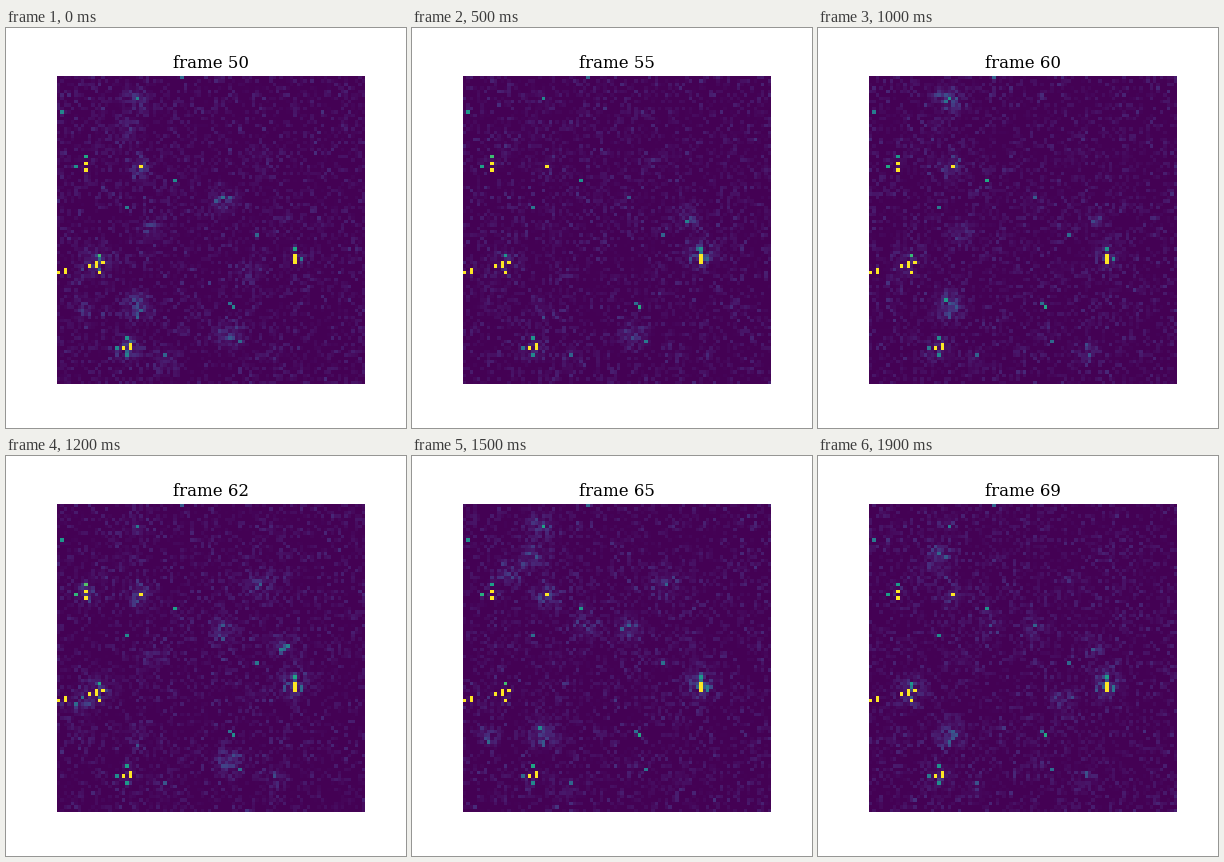
Recreate the animation shown at these times as a matplotlib script. Size 400 by 400 pixels, loop 2000 ms.

```python
import numpy as np
import matplotlib.pyplot as plt
from matplotlib.animation import FuncAnimation

plt.rcParams["font.family"] = "DejaVu Serif"

N = 90        # cells per side
FRAMES = 20
FIRST = 50    # number in the first title

# saturated spots: column, row, height in cells
BRIGHT = [(8, 25, 1), (8, 27, 1), (24, 26, 1), (9, 55, 1), (11, 54, 2),
          (13, 54, 1), (0, 57, 1), (2, 56, 2), (12, 57, 1), (69, 52, 3),
          (19, 79, 1), (21, 78, 2)]

# lasting weaker cells, brightest first: column, row
GLOW = [(8, 23), (12, 52), (5, 26), (69, 50), (51, 67), (20, 76), (34, 30),
        (23, 6), (1, 10), (20, 81), (20, 38), (17, 79), (71, 53), (58, 46),
        (50, 66), (53, 77), (48, 35), (36, 0), (31, 81), (23, 70)]

# centres of the areas that flare up now and then, busiest first
SITES = [(8, 25), (69, 52), (20, 79), (7, 57), (12, 54), (23, 67), (35, 35),
         (23, 6), (59, 23), (65, 41), (27, 45), (56, 57), (31, 83), (50, 75),
         (13, 20), (24, 26), (48, 36), (20, 15), (7, 67), (63, 80)]

rows, cols = np.mgrid[:N, :N]
fixed = np.random.default_rng(7)
texture = fixed.gamma(1.5, 0.6, (N, N))
glow_levels = np.linspace(0.64, 0.28, len(GLOW))
chances = np.linspace(0.65, 0.3, len(SITES))
radii = fixed.uniform(1.7, 2.6, len(SITES))


def field(i):
    rng = np.random.default_rng(100 + i)
    img = np.clip(rng.normal(-0.004, 0.04, (N, N)), 0, None)
    speckle = texture * rng.uniform(0.3, 1.3, (N, N))

    for (c, r), size, chance in zip(SITES, radii, chances):
        power = rng.uniform(0.08, 0.2) if rng.random() < chance else 0.03
        d2 = (cols - c) ** 2 + (rows - r) ** 2
        img += power * speckle * np.exp(-d2 / (2 * size ** 2))

    for (c, r), level in zip(GLOW, glow_levels):
        img[r, c] = level * rng.uniform(0.8, 1.15)
    for c, r, h in BRIGHT:
        img[r:r + h, c] = 1
    return img


fig = plt.figure(figsize=(4, 4), dpi=100, facecolor="white")
ax = fig.add_subplot()
ax.axis("off")
image = ax.imshow(field(0), cmap="viridis", vmin=0, vmax=1,
                  interpolation="nearest")
title = ax.set_title(f"frame {FIRST}", fontsize=12)


def update(i):
    image.set_data(field(i))
    title.set_text(f"frame {FIRST + i}")
    return image, title


anim = FuncAnimation(fig, update, frames=FRAMES, interval=100,
                     repeat=True, repeat_delay=0)
plt.show()
```
